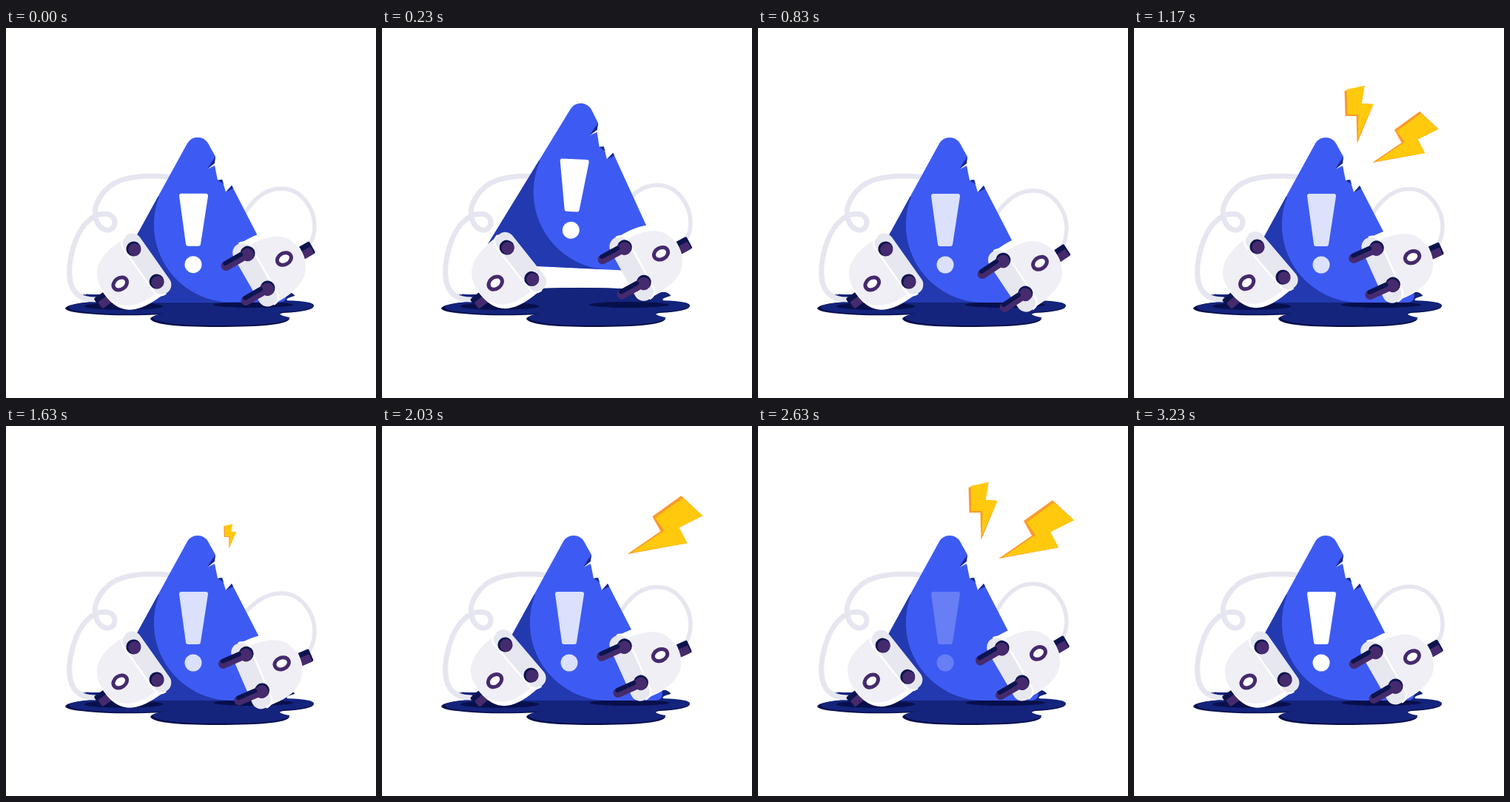
Animation, 500 px wide and 500 px high, one loop 3.26 s. Source, as an HTML page:

```html
<!DOCTYPE html>
<html>
<head>
<meta charset="utf-8">
<style>
html, body { margin: 0; width: 100%; height: 100%; overflow: hidden; background: #fff; }
svg { display: block; width: 100vw; height: 100vh; }
.cable { fill: none; stroke: #e6e6f0; stroke-linecap: round; }
.navy { fill: #0b144f; }
.purple { fill: #452a6d; }
.orange { fill: #fb9a2c; }
.yellow { fill: #ffc90e; }
.shade { fill: #f0eff6; transform: translateY(var(--light)); }
</style>
</head>
<body>
<svg viewBox="0 0 500 500">
  <defs>
    <path id="puddle" d="M80 379Q82 372 125 370L112 366Q100 364 104 360Q120 362 150 357Q200 351 270 351Q340 351 375 358Q384 355 390 362Q375 366 380 369Q416 370 416 376Q414 383 375 385Q360 388 383 393Q380 404 285 404Q200 404 195 393Q197 388 215 387Q150 390 110 386Q82 384 80 379Z"/>
    <path id="sign" d="M245 156Q250 148 259 148Q268 148 273 156L283 174L281 183L272 191L282 186L286 206L292 205L297 222L305 213L374 347Q386 371 368 371H146Q130 371 138 351Z"/>
    <clipPath id="inSign"><use href="#sign"/></clipPath>
    <path id="dome" d="M0-46H-11C-52-46-67-30-67 0S-52 46-11 46H0Z"/>
    <clipPath id="inDome"><use href="#dome"/></clipPath>
    <!-- plug: +x points out of the face, +y towards the ground -->
    <g id="body">
      <g transform="translate(0 6)">
        <rect class="navy" x="-83" y="-9" width="25" height="18" rx="2"/>
        <rect class="purple" x="-81" y="-2" width="22" height="11" rx="2"/>
      </g>
      <use href="#dome" fill="#fff" stroke="#fff" stroke-width="1.5"/>
      <g clip-path="url(#inDome)"><use href="#dome" class="shade"/></g>
      <rect x="-11" y="-47.5" width="27" height="95" rx="13" fill="#e7e7f0"/>
      <path d="M1-47.5Q-11-47-11-34V34Q-11 47 1 47.5" fill="none" stroke="#fff" stroke-width="2.5"/>
      <ellipse cx="-42" cy="1" rx="10" ry="7.7" fill="#fff" stroke="#452a6d" stroke-width="5"/>
    </g>
    <g id="hole">
      <circle class="navy" r="10"/>
      <circle class="purple" cx=".5" cy="1.7" r="8.5"/>
    </g>
    <g id="prong" stroke-linecap="round">
      <circle class="navy" cx="-3" r="10"/>
      <circle class="purple" cx="-2" cy="1.5" r="8.8"/>
      <path d="M-3 0H31" stroke="#452a6d" stroke-width="13"/>
      <path d="M6-3.5H30" stroke="#0b144f" stroke-width="6"/>
    </g>
  </defs>

  <use href="#puddle" fill="#070f4c"/>
  <use href="#puddle" fill="#14247c" transform="translate(6.2 14) scale(.985 .96)"/>
  <ellipse cx="159" cy="376" rx="53" ry="5" fill="#070f4c"/>
  <ellipse cx="334" cy="374" rx="54" ry="4" fill="#070f4c"/>

  <path class="cable" stroke-width="7" d="M240 204C205 198 175 199 155 206C130 215 117 240 121 256C125 276 145 278 147 264C148 248 125 247 111 261C92 278 82 320 87 343C91 360 103 367 120 367"/>
  <path class="cable" id="cord" stroke-width="5.5"/>

  <g id="triangle">
    <use href="#sign" fill="#3d5bf3"/>
    <path clip-path="url(#inSign)" fill="#2339b0" d="M207 228A105 105 0 0 0 307 371L110 372V228Z"/>
    <path fill="#1a2a8c" d="M283 174L282 183L272 191L278 181ZM286 206L292 205L294 211ZM297 222L305 213L307 217Z"/>
    <g id="mark" fill="#fff">
      <path d="M237 227H270L260 292H246Z" stroke="#fff" stroke-width="6" stroke-linejoin="round"/>
      <circle cx="253" cy="320" r="11.5"/>
    </g>
  </g>

  <g id="socket" style="--light: -6px">
    <g transform="translate(188 320.5) rotate(-35.2)">
      <use href="#body"/>
      <use href="#hole" y="-27"/>
      <use href="#hole" y="27"/>
    </g>
  </g>
  <g id="plug" style="--light: 8px">
    <use href="#body" y="3"/>
    <use href="#prong" y="-27"/>
    <use href="#prong" y="27"/>
  </g>

  <!-- bolts: tip at the origin -->
  <g id="boltL">
    <path class="orange" d="M-17-71L10-78L6-54L22-53L0 0L-1-37H-16Z"/>
    <path class="yellow" d="M-14-73L10-78L6-54L22-53L1-6L2-39H-13Z"/>
  </g>
  <g id="boltR">
    <path class="orange" d="M34-51L73-79L102-52L70-36L81-15L0 0L45-31Z"/>
    <path class="yellow" d="M38-49L75-76L102-52L70-36L81-15L6-2L50-32Z"/>
  </g>
</svg>
<script>
const LOOP = 3260, ACTIVE = 3200, BEAT = 400;
const $ = id => document.getElementById(id);
const move = (id, value) => $(id).setAttribute('transform', value);
const lerp = (a, b, k) => a + (b - a) * k;

// plug poses, one per beat, played forth and back: x, y, turn
const POSES = [[337.5, 329.5, 0], [338.7, 316.5, 1.9], [344, 338, -4], [336, 323, 5.8], [332.5, 334, 6.5]];

function drawTriangle(t) {
  const u = Math.min(t / 800, 1), h = 4 * u * (1 - u);
  move('triangle', `translate(${2.8 * h} ${-57 * h}) rotate(${3.3 * h} 253 320)`);
  const blink = Math.abs(t / 200 % 2 - 1);
  $('mark').setAttribute('opacity', t > 800 && t < 2800 ? lerp(.08, .95, blink) : 1);
}

function drawPlugs(t) {
  move('socket', `rotate(${-5.3 * Math.sin(Math.PI * t / 800) ** 2} 138 363)`);

  const beat = Math.min(t, ACTIVE - t) / BEAT;
  const i = Math.min(Math.floor(beat), 3);
  const k = (1 - Math.cos(Math.PI * (beat - i))) / 2;
  const [x, y, turn] = POSES[i].map((v, j) => lerp(v, POSES[i + 1][j], k));
  const angle = 150.1 + turn, a = angle * Math.PI / 180;
  move('plug', `translate(${x} ${y}) rotate(${angle}) scale(1 -1)`);

  // the cord hangs on the back end of the plug
  const endX = x - 76 * Math.cos(a) + 6 * Math.sin(a);
  const endY = y - 76 * Math.sin(a) - 6 * Math.cos(a);
  const top = 217 + .73 * (endY - 296.8);
  $('cord').setAttribute('d', `M318 258C335 ${top + 11} 352 ${top} 372 ${top}` +
    `C400 ${top} 417 ${top + 28} 417 ${top + 51}C417 ${top + 65} 412 ${endY - 6} ${endX} ${endY}`);
}

function drawBolt(id, p, from, to, x, y) {
  const s = p > from && p < to ? Math.min(1, (p - from) / 73) : 0;
  $(id).style.display = s ? '' : 'none';
  move(id, `translate(${x} ${y}) scale(${s})`);
}

function drawBolts(t) {
  const p = t < 895 || t > 3010 ? -1 : (t - 895) % 705;
  drawBolt('boltL', p, 0, 420, 301.5, 167 - .04 * p);
  drawBolt('boltR', p, 212, 505, 325 + .06 * (p - 325), 179.3 - .057 * (p - 325));
}

const start = performance.now();
function draw() {
  const t = Math.min((performance.now() - start) % LOOP, ACTIVE);
  drawTriangle(t);
  drawPlugs(t);
  drawBolts(t);
  requestAnimationFrame(draw);
}
draw();
</script>
</body>
</html>
```
